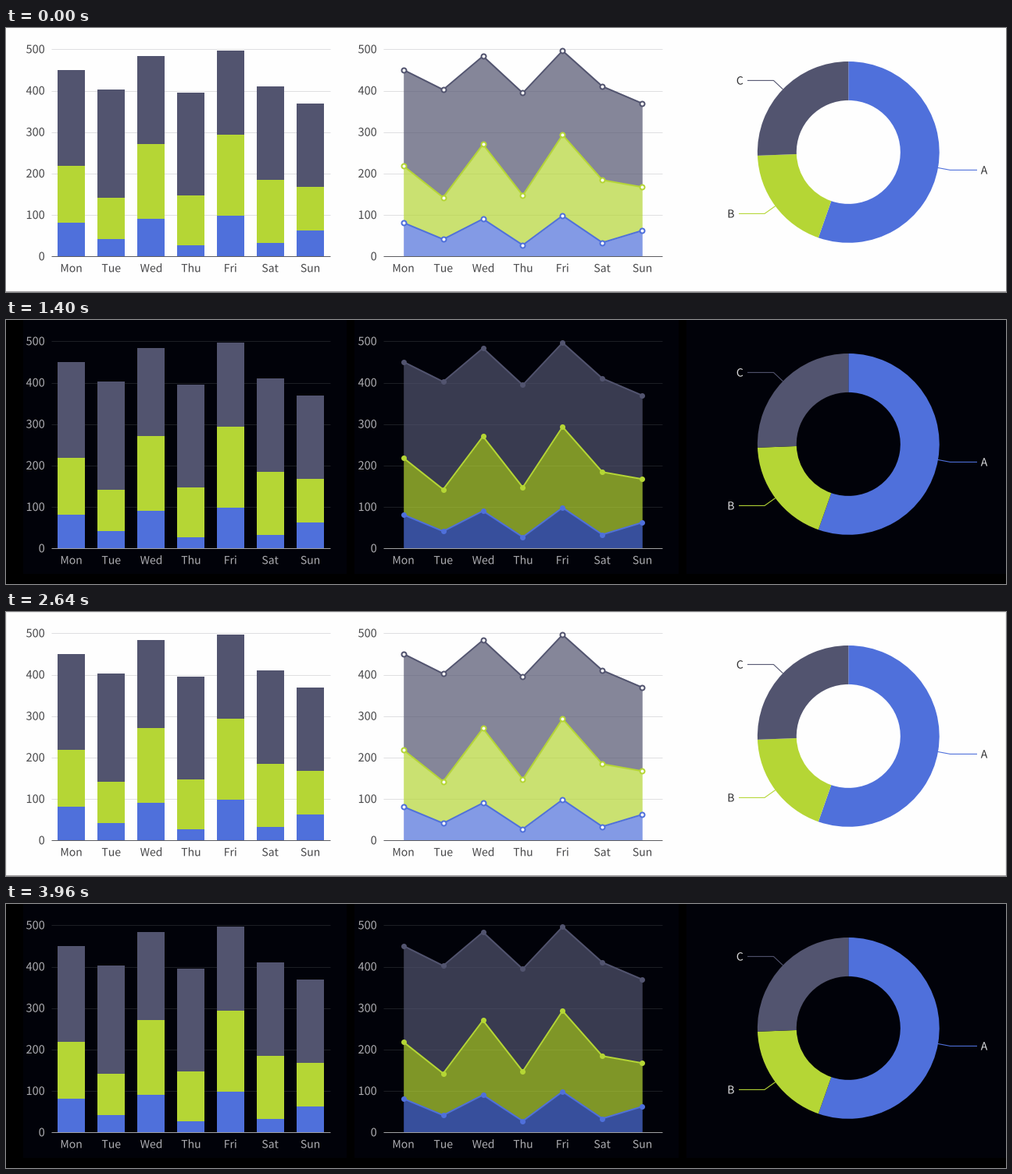
Write a matplotlib script that moves like this. It is 1280 px wide and 339 px high and loops after 5100 ms.

```python
import matplotlib.pyplot as plt
import numpy as np
from matplotlib.animation import FuncAnimation
from matplotlib.collections import LineCollection, PolyCollection
from matplotlib.patches import PathPatch, Rectangle, Wedge
from matplotlib.path import Path
from matplotlib.textpath import TextPath
from matplotlib.transforms import Affine2D

plt.rcParams["font.family"] = ["Noto Sans CJK JP", "DejaVu Sans"]

W, H, DPI = 1280, 339, 100
PX = 72 / DPI  # one pixel in points
LOOP, STEP = 5100, 20

BLUE, GREEN, SLATE = SERIES = ["#4f70db", "#b5d635", "#52546f"]
DAYS = "Mon Tue Wed Thu Fri Sat Sun".split()
TOTALS = np.array([
    [81, 41, 90, 27, 98, 33, 62],
    [218, 142, 270, 147, 293, 184, 167],
    [450, 402, 483, 394, 496, 410, 369],
])
LEVELS = np.vstack([np.zeros(7), TOTALS])
TICKS = range(0, 501, 100)

BAR_X, LINE_X, PLOT_W = 58, 483, 357
PITCH, BAR_W = 50.93, 35
CX, CY, R_OUT, R_IN = 1078.3, 159.4, 116.4, 66.5

LIGHT = dict(bg="#fefefe", grid="#dfdfe1", axis="#5c5c60", tick="#48484a",
             label="#303032", hollow=True)
DARK = dict(bg="#000000", panel="#010209", grid="#1c1e24", axis="#a2a2a4",
            tick="#acacb0", label="#dcdcde", hollow=False)

fig = plt.figure(figsize=(W / DPI, H / DPI), dpi=DPI)
ax = fig.add_axes([0, 0, 1, 1])
ax.set_xlim(0, W)
ax.set_ylim(H, 0)
ax.axis("off")


def value_y(v):
    return 293.1 - 0.532 * np.asarray(v, float)


def day_x(left):
    return left + 25.7 + PITCH * np.arange(7)


def rect(x, y, w, h, color, z=0):
    return ax.add_patch(Rectangle((x, y), w, h, fc=color, lw=0, zorder=z))


def glyphs(text, x, y, size, align):
    """Outline of a text, set by its ink box at x and centred on y."""
    path = TextPath((0, 0), text, size=size)
    box = path.get_extents()
    anchor = {"left": box.x0, "right": box.x1,
              "center": (box.x0 + box.x1) / 2}[align]
    move = Affine2D().translate(-anchor, -0.733 * size / 2)
    return path.transformed(move.scale(1, -1).translate(x, y))


def draw_text(items, color):
    path = Path.make_compound_path(*[glyphs(*item) for item in items])
    return ax.add_patch(PathPatch(path, fc=color, lw=0, zorder=9))


def strokes(lines, color, width, z):
    return ax.add_collection(LineCollection(
        lines, colors=color, linewidths=width * PX, zorder=z))


def draw_axes(left, theme):
    right = left + PLOT_W
    rows = [[(left, value_y(t) + 0.2), (right, value_y(t) + 0.2)]
            for t in TICKS]
    labels = [(str(t), left - 9, value_y(t) - 0.1, 14.5, "right")
              for t in TICKS]
    labels += [(d, x, 308.2, 14, "center")
               for d, x in zip(DAYS, day_x(left))]
    return [strokes(rows[1:], theme["grid"], 1, 1),
            strokes(rows[:1], theme["axis"], 1, 4),
            draw_text(labels, theme["tick"])]


def draw_bars():
    boxes, colors = [], []
    for k, color in enumerate(SERIES):
        for x, lo, hi in zip(day_x(BAR_X) - BAR_W / 2,
                             value_y(LEVELS[k]), value_y(LEVELS[k + 1])):
            boxes.append([(x, lo), (x + BAR_W, lo), (x + BAR_W, hi), (x, hi)])
            colors.append(color)
    return [ax.add_collection(PolyCollection(
        boxes, facecolors=colors, linewidths=0, zorder=3))]


def draw_areas(theme):
    x, parts = day_x(LINE_X), []
    for k, color in enumerate(SERIES):
        lo, hi = value_y(LEVELS[k]), value_y(LEVELS[k + 1])
        parts.append(ax.fill_between(x, lo, hi, color=color, alpha=0.7,
                                     lw=0, zorder=2))
        parts += ax.plot(x, hi, color=color, lw=2 * PX, zorder=5)
        size = 6 if theme["hollow"] else 5
        parts.append(ax.scatter(
            x, hi, s=(size * PX) ** 2, lw=2 * PX, edgecolors=color,
            facecolors="white" if theme["hollow"] else color, zorder=6))
    return parts


def draw_ring(theme):
    cuts = [0, 199.3, 267.8, 360]
    parts = []
    for a, b, color in zip(cuts, cuts[1:], SERIES):
        parts.append(ax.add_patch(Wedge(
            (CX, CY), R_OUT, a - 90, b - 90, width=R_OUT - R_IN,
            fc=color, lw=0, zorder=3)))
    leads = [[(1192.5, 179.4), (1208.5, 182.4), (1243, 182.4)],
             [(984.8, 228.6), (971, 238.4), (938, 238.4)],
             [(994.5, 78.7), (982.5, 67.4), (949, 67.4)]]
    names = [("A", 1247.8, 182.4, 14, "left"),
             ("B", 931.8, 238.4, 14, "right"),
             ("C", 943.3, 67.4, 14, "right")]
    parts.append(strokes(leads, SERIES, 1.1, 2))
    parts.append(draw_text(names, theme["label"]))
    return parts


def draw_theme(theme):
    parts = [rect(0, 0, W, H, theme["bg"])]
    if "panel" in theme:
        parts += [rect(x0, 0, x1 - x0, 326, theme["panel"])
                  for x0, x1 in [(22, 436), (446, 861), (871, W)]]
    else:
        parts.append(rect(0, H - 1, W, 1, "#a09ea0", 1))
    parts += draw_axes(BAR_X, theme) + draw_axes(LINE_X, theme)
    return parts + draw_bars() + draw_areas(theme) + draw_ring(theme)


def side_edges(top):
    return [rect(x, top, 1, H - 1 - top, "#ebebeb") for x in (0, W - 1)]


light, dark = draw_theme(LIGHT), draw_theme(DARK)
corners = side_edges(312)
border = side_edges(0) + [rect(0, 0, W, 1, "#ebebeb")]


def show(parts, on):
    for part in parts:
        part.set_visible(on)


def update(i):
    t = i * STEP
    is_dark = 1400 <= t < 2560 or t >= 3920
    show(light, not is_dark)
    show(dark, is_dark)
    show(corners, 1240 <= t < 1400)
    show(border, 2560 <= t < 3920)
    return []


anim = FuncAnimation(fig, update, frames=LOOP // STEP, interval=STEP,
                     repeat=True, repeat_delay=0, blit=False)
plt.show()
```
